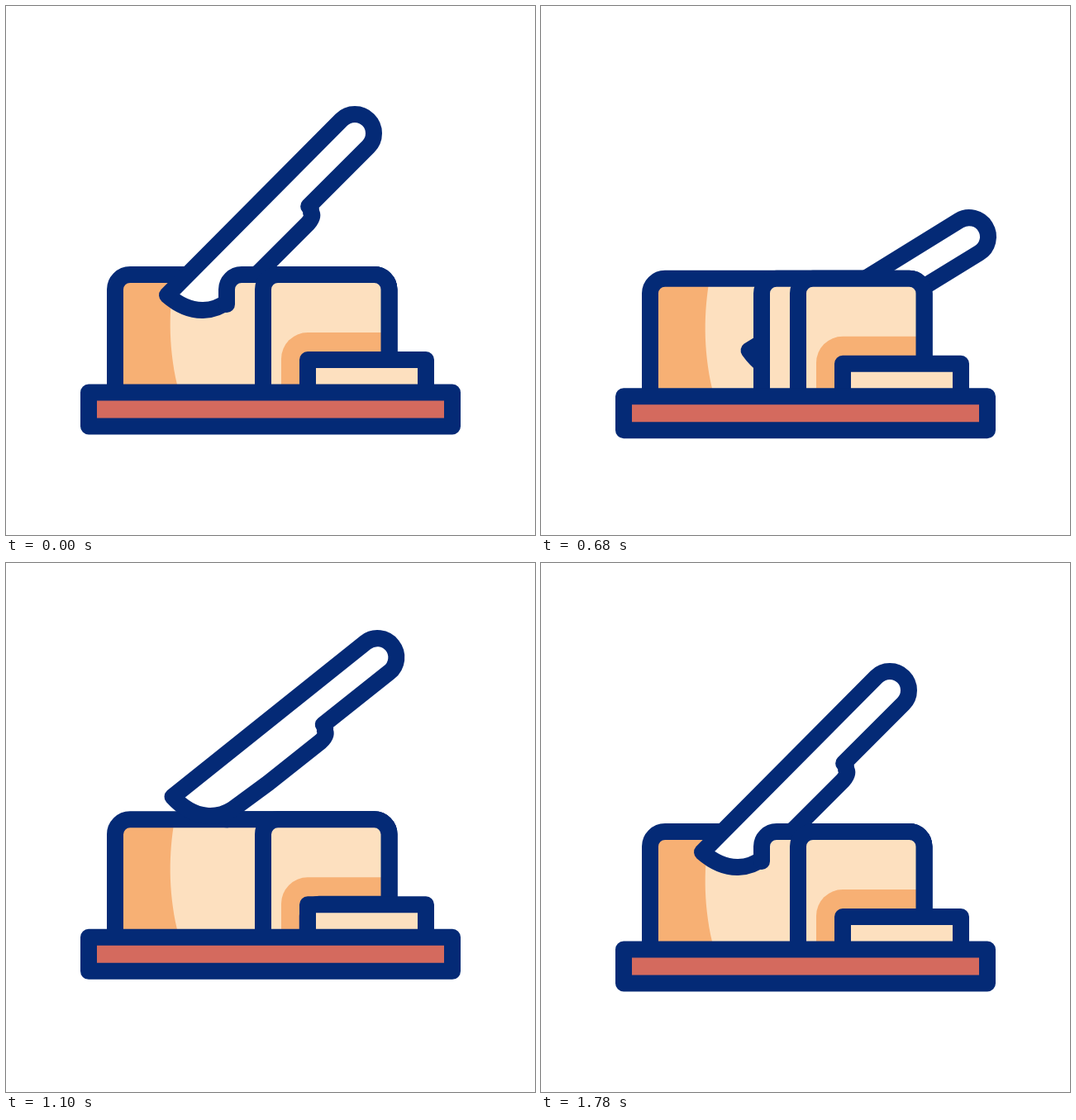
An HTML page with a canvas that plays this animation: 640 by 640 pixels, repeating every 2060 ms.

```html
<!DOCTYPE html>
<html lang="en">
<head>
<meta charset="utf-8">
<title>Slicing bread</title>
<style>
  html, body { margin: 0; width: 100%; height: 100%; overflow: hidden; background: #fff; }
  canvas { display: block; width: 100vw; height: 100vh; }
</style>
</head>
<body>
<canvas id="stage" width="640" height="640"></canvas>
<script>
const ctx = document.getElementById('stage').getContext('2d');
const LOOP = 2060;
const NAVY = '#042a76', CREAM = '#fde0bf', ORANGE = '#f7b074', RED = '#d46a5e', YELLOW = '#fdcb50';
const TOP = 325, BASE = 458, RIGHT = 463.5;

const ease = s => (1 - Math.cos(Math.PI * Math.min(1, Math.max(0, s)))) / 2;
const span = (t, from, to) => ease((t - from) / (to - from));
const mix = (a, b, p) => a + (b - a) * p;

// Eased value through [time, value] stops
function track(t, stops) {
  let value = stops[0][1];
  for (let i = 1; i < stops.length; i++) {
    const [t0, v0] = stops[i - 1], [t1, v1] = stops[i];
    if (t >= t0) value = mix(v0, v1, span(t, t0, t1));
  }
  return value;
}

const bounce = [[200, 0], [510, -16.5], [820, 20], [1155, -17], [1466, 20], [1780, 0]];
const poses = (down, up) => [[200, 0], [630, down], [760, down], [1200, up], [1280, up], [1780, 0]];
const knifeX = poses(96, 18), knifeY = poses(120.5, -45), knifeTilt = poses(13.5, 5.6);

const blade = new Path2D(
  'M0-23A23 23 0 0 1 0 23L-102 23Q-101 27-105 30Q-106 36-117 37' +
  'L-198 37L-252 35C-270 33-296 20-299-22Z');
const crust = new Path2D('M132 458V343A18 18 0 0 1 150 325H204C197 365 196 410 207 458Z');
const slice = new Path2D('M365 468V428H508V468');
const tray = new Path2D('M100 467.5H540V508.5H100Z');

function paint(path, fill, line) {
  if (fill) { ctx.fillStyle = fill; ctx.fill(path); }
  if (line) { ctx.strokeStyle = line; ctx.stroke(path); }
}

// Bread outline from its left edge, over the top, to the right wall
function bread(x, end = BASE) {
  const p = new Path2D();
  p.moveTo(x, end);
  p.arcTo(x, TOP, x + 40, TOP, Math.min(18, end - TOP));
  p.arcTo(RIGHT, TOP, RIGHT, BASE, 18);
  p.lineTo(RIGHT, BASE);
  return p;
}

function panel(x, y, r) {
  const p = new Path2D();
  p.moveTo(x, BASE);
  p.arcTo(x, y, RIGHT, y, r);
  p.lineTo(RIGHT, y);
  p.lineTo(RIGHT, BASE);
  return p;
}

function drawKnife(t) {
  ctx.save();
  ctx.translate(422 + track(t, knifeX), 154 + track(t, knifeY));
  ctx.rotate((track(t, knifeTilt) - 45) * Math.PI / 180);
  paint(blade, '#fff', NAVY);
  ctx.restore();
}

function drawCut(t) {
  let x = 267, end;
  if (t < 740) end = track(t, [[200, 361], [600, BASE]]);
  else if (t < 900) { x = mix(267, 311, span(t, 740, 900)); end = BASE; }
  else end = TOP + 36 * span(t, 1280, 1780) ** 2;
  paint(bread(x), CREAM);
  paint(bread(x, end), null, NAVY);
}

function drawFall(t) {
  if (t < 740 || t > 1117) return;
  const p = span(t, 740, 1117);
  const shape = panel(mix(311, 365, p), mix(TOP, 428, p), mix(18, 14, p));
  paint(shape, CREAM);
  paint(panel(333 + 35 * p, mix(395, 428, p ** 2.5), 32 * (1 - p)), ORANGE);
  paint(shape, null, NAVY);
}

function drawRays(t) {
  const head = span(t, 1120, 1240), tail = span(t, 1270, 1400);
  if (head <= 0 || tail >= 1) return;
  ctx.strokeStyle = YELLOW;
  for (const [x0, y0, x1, y1] of [
    [362, 409.5, 340, 367.5], [405, 401.5, 402, 353.5], [450, 410.5, 461, 376.5]
  ]) {
    ctx.beginPath();
    ctx.moveTo(mix(x0, x1, tail), mix(y0, y1, tail));
    ctx.lineTo(mix(x0, x1, head), mix(y0, y1, head));
    ctx.stroke();
  }
}

function draw(t) {
  ctx.fillStyle = '#fff';
  ctx.fillRect(0, 0, 640, 640);
  ctx.save();
  ctx.translate(0, track(t, bounce));
  ctx.lineWidth = 20;
  ctx.lineJoin = ctx.lineCap = 'round';

  const inFront = t >= 760 && t < 1270;
  paint(bread(132), CREAM);
  paint(crust, ORANGE);
  paint(bread(132), null, NAVY);
  if (!inFront) drawKnife(t);
  drawCut(t);
  paint(bread(311), CREAM);
  paint(panel(333, 395, 32), ORANGE);
  paint(bread(311), null, NAVY);
  drawFall(t);
  paint(slice, CREAM, NAVY);
  paint(tray, RED, NAVY);
  if (inFront) drawKnife(t);
  drawRays(t);
  ctx.restore();
}

const start = performance.now();
function tick() {
  draw((performance.now() - start) % LOOP);
  requestAnimationFrame(tick);
}
tick();
</script>
</body>
</html>
```
